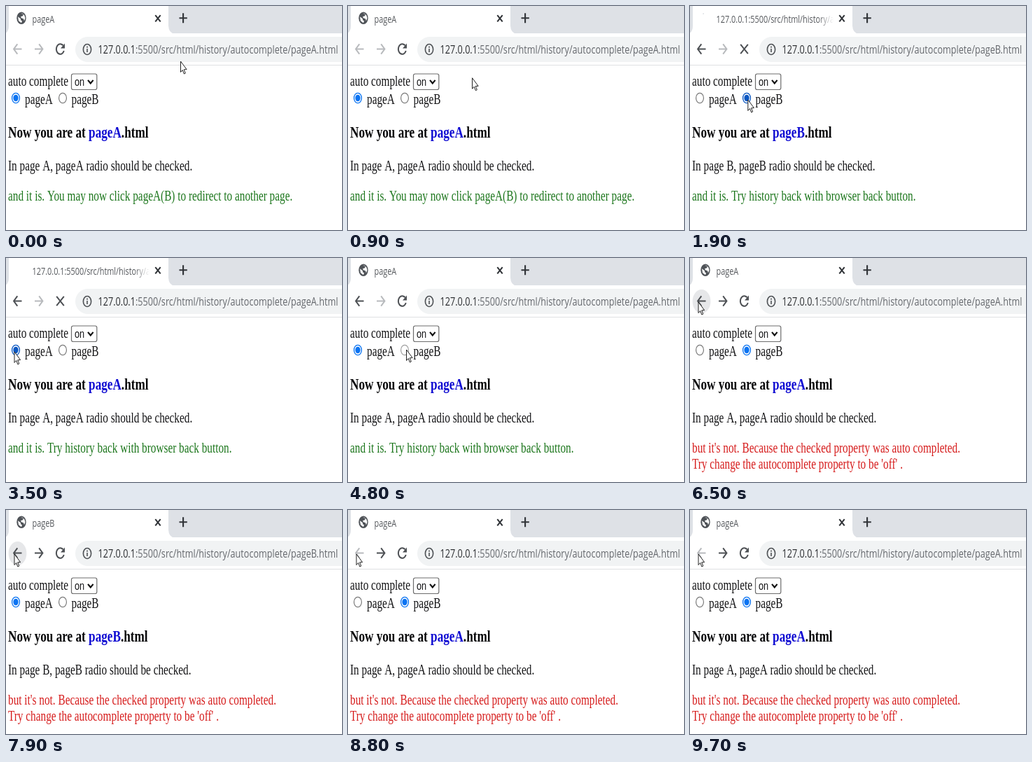
These frames come from a looping animation (480x320 px, 9800 ms). An HTML page with a canvas:

```html
<!DOCTYPE html>
<html lang="en">
<head>
<meta charset="utf-8">
<title>History autocomplete</title>
<style>
html, body { margin: 0; width: 100%; height: 100%; overflow: hidden; background: #fff; }
canvas { display: block; width: 480px; height: 320px; }
</style>
</head>
<body>
<canvas id="stage" width="480" height="320"></canvas>
<script>
const ctx = document.getElementById('stage').getContext('2d');
const LOOP = 9800, STEP = 100;
const SX = 0.954, SY = 1.26;
const SERIF = '"Liberation Serif", "Times New Roman", serif';
const SANS = '"Open Sans", "Noto Sans", sans-serif';
const DARK = '#4d5054', PALE = '#b8babd', INK = '#141416';

const GREETING = ['and it is. You may now click pageA(B) to redirect to another page.'];
const SUCCESS = ['and it is. Try history back with browser back button.'];
const FAILURE = ['but it\'s not. Because the checked property was auto completed.',
  'Try change the autocomplete property to be \'off\' .'];

// Each visit: start time, time until loaded, page, checked radio, message, history flags.
const visits = [
  { at: 0, load: 0, page: 'A', checked: 'A', note: GREETING },
  { at: 1800, load: 200, page: 'B', checked: 'B', note: SUCCESS, back: true },
  { at: 3500, load: 200, page: 'A', checked: 'A', note: SUCCESS, back: true },
  { at: 4900, load: 100, page: 'B', checked: 'B', note: SUCCESS, back: true },
  { at: 6300, load: 100, page: 'A', checked: 'B', note: FAILURE, back: true, forward: true },
  { at: 7500, load: 0, page: 'B', checked: 'A', note: FAILURE, back: true, forward: true },
  { at: 8800, load: 0, page: 'A', checked: 'B', note: FAILURE, forward: true }
];

// Pointer moves: start, end, destination.
const START = [249.5, 79];
const moves = [
  [400, 1500, 82.8, 134],
  [2300, 3200, 12, 134],
  [3900, 4700, 83.5, 131],
  [5200, 5900, 12, 63]
];

function pointerAt(t) {
  let [x, y] = START;
  for (const [from, to, nx, ny] of moves) {
    const p = Math.min(1, Math.max(0, (t - from) / (to - from)));
    const e = p * p * (3 - 2 * p);
    x += (nx - x) * e;
    y += (ny - y) * e;
  }
  return [x, y];
}

function text(str, x, y, font, color) {
  ctx.save();
  ctx.translate(x, y);
  ctx.scale(SX, SY);
  ctx.font = font;
  ctx.fillStyle = color;
  ctx.fillText(str, 0, 0);
  const width = ctx.measureText(str).width * SX;
  ctx.restore();
  return x + width;
}

const body = (str, y, color = INK, x = 3) => text(str, x, y, '16px ' + SERIF, color);

function oval(x, y, r, fill, stroke, width = 1.1) {
  ctx.beginPath();
  ctx.ellipse(x, y, r * SX, r * SY, 0, 0, Math.PI * 2);
  paint(fill, stroke, width);
}

function paint(fill, stroke, width) {
  if (fill) { ctx.fillStyle = fill; ctx.fill(); }
  if (stroke) { ctx.strokeStyle = stroke; ctx.lineWidth = width; ctx.stroke(); }
}

function lines(paths, color, width) {
  ctx.beginPath();
  for (const points of paths) points.forEach(([x, y], i) => i ? ctx.lineTo(x, y) : ctx.moveTo(x, y));
  paint(null, color, width);
}

function polygon(points, fill, stroke, width) {
  ctx.beginPath();
  points.forEach(([x, y]) => ctx.lineTo(x, y));
  ctx.closePath();
  paint(fill, stroke, width);
}

function cross(x, y, w, h, color, width) {
  lines([[[x - w, y - h], [x + w, y + h]], [[x + w, y - h], [x - w, y + h]]], color, width);
}

function arrow(x, dir, color) {
  const tip = x + 6 * dir;
  lines([[[x - 6 * dir, 61.5], [tip, 61.5]],
    [[x + dir * 0.2, 54.4], [tip - dir * 0.6, 61.5], [x + dir * 0.2, 68.6]]], color, 2);
}

function globe(x, y) {
  oval(x, y, 7, '#4f5358');
  polygon([[x - 5, y - 2], [x - 1, y + 1], [x - 1, y + 3], [x + 1, y + 4], [x, y + 7], [x - 4, y + 4]], '#fff');
  polygon([[x - 1, y - 6.5], [x + 3, y - 5.5], [x + 2, y - 3], [x - 1, y - 2], [x, y], [x + 3, y + 1],
    [x + 4, y + 4], [x + 5.5, y], [x + 4.5, y - 3.5], [x + 2, y - 6.5]], '#fff');
}

function tabStrip(visit, loading, age) {
  ctx.fillStyle = '#dee1e6';
  ctx.fillRect(0, 0, 480, 39);
  ctx.beginPath();
  ctx.moveTo(-4, 39.5);
  ctx.quadraticCurveTo(4, 39, 4, 28);
  ctx.lineTo(4, 0);
  ctx.lineTo(232, 0);
  ctx.lineTo(232, 28);
  ctx.quadraticCurveTo(232.5, 39, 241, 39.5);
  paint('#fff');

  const font = '11.4px ' + SANS;
  if (loading) {
    ctx.beginPath();
    ctx.ellipse(22, 18, 6, 8, 0, -2.2, -2.2 + age / 400);
    paint(null, '#d5d8dc', 1.5);
    text('127.0.0.1:5500/src/html/history/a', 37.5, 23.5, font, '#55585c');
    const fade = ctx.createLinearGradient(183, 0, 205, 0);
    fade.addColorStop(0, 'rgba(255,255,255,0)');
    fade.addColorStop(1, '#fff');
    ctx.fillStyle = fade;
    ctx.fillRect(183, 5, 25, 28);
  } else {
    globe(22, 17.3);
    text('page' + visit.page, 37.5, 23.5, font, '#55585c');
  }
  cross(217, 17.7, 3.7, 4.6, '#303337', 2);
  lines([[[247.5, 17.3], [258.8, 17.3]], [[253.1, 10.3], [253.1, 24.3]]], '#303337', 2.1);
}

function toolbar(visit, loading, hoverBack) {
  if (hoverBack && visit.back) oval(16.5, 62, 13.5, '#e6e7e9');
  arrow(16.5, -1, visit.back ? DARK : PALE);
  arrow(47, 1, visit.forward ? DARK : PALE);

  if (loading) {
    cross(77.5, 61.5, 5.3, 6.6, DARK, 2);
  } else {
    ctx.beginPath();
    ctx.ellipse(77.5, 61.5, 5.6, 7.2, 0, 0.35, 5.5);
    paint(null, DARK, 2);
    polygon([[84, 53.5], [84, 60.5], [78, 60.5]], DARK);
  }

  ctx.beginPath();
  ctx.roundRect(99, 44, 420, 36, 18);
  paint('#f1f3f4');
  oval(116, 62, 5.9, null, DARK, 1.6);
  ctx.fillStyle = DARK;
  ctx.fillRect(115.2, 61, 1.6, 5);
  ctx.fillRect(115.2, 57.6, 1.6, 2);

  const font = '13.25px ' + SANS;
  const end = text('127.0.0.1', 131.5, 68, font, '#2d2f32');
  text(':5500/src/html/history/autocomplete/page' + visit.page + '.html', end, 68, font, '#66696e');
  ctx.fillStyle = '#dfe0e2';
  ctx.fillRect(0, 84, 480, 1);
}

function radio(x, y, checked, hover, pressed) {
  if (checked) {
    const blue = hover ? '#0a57c2' : '#0b74f2';
    oval(x, y, 5.7, '#fff', blue, 1.3);
    oval(x, y, 3.8, blue);
  } else {
    oval(x, y, 5.7, '#fff', pressed ? '#a0a0a0' : hover ? '#4f4f4f' : '#7a7a7a', 1.2);
  }
}

function page(visit, pointer, pressed) {
  const near = x => Math.hypot(pointer[0] - x, pointer[1] - 131.5) < 7;
  body('auto complete', 114);
  ctx.beginPath();
  ctx.roundRect(93.5, 97, 36.3, 22.5, 2.5);
  paint('#fff', '#6c6c6c', 1.2);
  text('on', 98, 113.5, '13.33px "Liberation Sans", Arial, sans-serif', INK);
  lines([[[117, 105.8], [120.8, 110.5], [124.6, 105.8]]], '#111', 2.1);

  radio(14, 131.5, visit.checked === 'A', near(14), pressed);
  body('pageA', 140, INK, 27);
  radio(81, 131.5, visit.checked === 'B', near(81), pressed);
  body('pageB', 140, INK, 93.5);

  const bold = 'bold 18px ' + SERIF;
  let x = text('Now you are at ', 3, 188, bold, '#060608');
  x = text('page' + visit.page, x, 188, bold, '#0f0bd2');
  text('.html', x, 188, bold, '#060608');

  body(`In page ${visit.page}, page${visit.page} radio should be checked.`, 234.7);
  const color = visit.note === FAILURE ? '#d61c1c' : '#1c761c';
  visit.note.forEach((line, i) => body(line, 277.7 + i * 23.3, color));
}

function drawPointer([x, y]) {
  const shape = [[0, 0], [0, 15.5], [2.7, 12.5], [4.9, 18], [6.8, 17], [4.7, 11.8], [8.6, 11.6]];
  polygon(shape.map(([dx, dy]) => [x + dx, y + dy]), '#fff', '#222', 1);
}

function draw(t) {
  const visit = visits.filter(v => v.at <= t).pop();
  const age = t - visit.at;
  const loading = age < visit.load;
  const pointer = pointerAt(t);
  const pressed = visits.some(v => v.at > t && v.at - t <= STEP);
  ctx.fillStyle = '#fff';
  ctx.fillRect(0, 0, 480, 320);
  tabStrip(visit, loading, age);
  toolbar(visit, loading, Math.hypot(pointer[0] - 16.5, pointer[1] - 62) < 14);
  page(visit, pointer, pressed);
  drawPointer(pointer);
}

const begin = performance.now();
function tick() {
  const t = (performance.now() - begin) % LOOP;
  draw(Math.floor(t / STEP) * STEP);
  requestAnimationFrame(tick);
}
tick();
</script>
</body>
</html>
```
